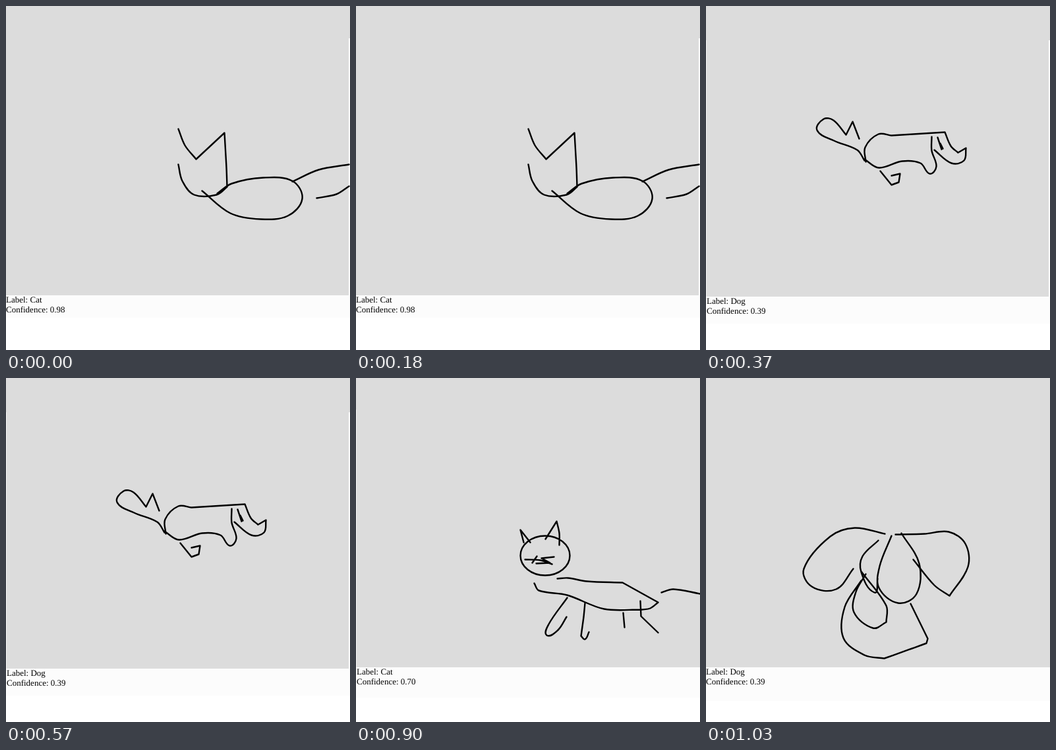
An HTML page with a canvas for the animation above (1.33 s loop, 522 by 522 pixels).

```html
<!DOCTYPE html>
<html lang="en">
<head>
<meta charset="utf-8">
<title>Doodle labels</title>
<style>
html, body { margin: 0; height: 100%; overflow: hidden; background: #fff; }
canvas { display: block; width: 522px; height: 522px; }
</style>
</head>
<body>
<canvas id="stage" width="522" height="522"></canvas>
<script>
const ctx = document.getElementById('stage').getContext('2d');
const LOOP = 1330;

// Each line is one pen stroke: key points of a smooth curve, with "/" after a sharp corner.
const sittingCat = `
  261 186, 271 211, 288 232 / 331 192 / 334 245, 335 274
  261 240, 267 265, 285 286, 319 286, 335 274
  320 284, 342 269, 390 260, 434 265, 449 292, 427 318, 386 323, 340 314, 297 280
  434 266, 474 248, 520 240
  471 291, 501 285, 520 273`;
const runningDog = `
  232 201, 222 175 / 212 195 / 193 173, 178 171, 168 188, 194 204, 229 218, 240 234
  242 236, 241 214, 261 194, 281 196 / 362 191 / 371 212, 382 222 / 394 215 / 391 234, 372 238, 346 218
  342 198, 342 219, 349 243, 339 254, 325 238, 297 235, 262 245, 240 232
  351 199, 357 217
  355 208, 359 216
  264 250 / 281 271 / 292 267 / 294 254 / 281 257`;
const walkingCat = `
  254 249 / 249 230 / 264 249
  287 244 / 304 217 / 308 235, 308 253
  256 275, 279 276, 297 282
  267 280, 274 270
  300 271, 281 273 / 294 280 / 273 281
  305 304, 321 303, 350 308, 404 310 / 458 340 / 446 349, 433 351 / 376 350, 320 329, 277 322, 270 311
  320 333, 292 373, 289 390, 306 382, 319 362
  347 341, 345 362 / 341 391 / 347 396, 353 385
  405 356, 407 378
  431 338, 432 361 / 458 386
  463 325, 481 320, 522 327`;
const dogFace = `
  271 236, 225 227, 188 240, 148 289, 160 316, 197 320, 223 289
  261 246, 237 270, 235 294, 255 325, 260 304
  281 239, 263 285, 262 318, 291 341, 319 327, 323 281, 296 235
  287 237, 331 236, 368 233, 393 251, 397 286, 369 330 / 346 314, 314 275
  242 297, 227 324, 224 355, 253 379, 273 370 / 273 345, 235 293
  235 307, 210 347, 208 394, 240 420, 270 425 / 312 410, 334 402 / 336 395 / 310 342`;

// Joins points with curves whose tangents run parallel to the neighbours' chord.
function addCurve(path, pts) {
  const last = pts.length - 1;
  const tangent = i => {
    const [ax, ay] = pts[Math.max(i - 1, 0)], [bx, by] = pts[Math.min(i + 1, last)];
    const len = Math.hypot(bx - ax, by - ay);
    return [(bx - ax) / len, (by - ay) / len];
  };
  for (let i = 1; i <= last; i++) {
    const [ax, ay] = pts[i - 1], [bx, by] = pts[i];
    const [ux, uy] = tangent(i - 1), [vx, vy] = tangent(i);
    const k = Math.hypot(bx - ax, by - ay) / 3;
    path.bezierCurveTo(ax + ux * k, ay + uy * k, bx - vx * k, by - vy * k, bx, by);
  }
}

function sketch(text) {
  const path = new Path2D();
  for (const stroke of text.trim().split('\n')) {
    let pen;
    for (const part of stroke.split('/')) {
      const pts = part.split(',').map(p => p.trim().split(' ').map(Number));
      if (pen) pts.unshift(pen);
      else path.moveTo(...pts[0]);
      addCurve(path, pts);
      pen = pts[pts.length - 1];
    }
  }
  return path;
}

const catHead = new Path2D();
catHead.ellipse(286.5, 269, 37.5, 30, 0, 0, 2 * Math.PI);
const walker = sketch(walkingCat);
walker.addPath(catHead);

// floor: lower edge of the grey area; foot: lower edge of the pale band
// left, right: top of the light side slivers (0 = none)
const dog = { label: 'Dog', score: '0.39', art: sketch(runningDog), x: 1, floor: 441, foot: 482, left: 52, right: 49 };
const scenes = [
  { end: 300, label: 'Cat', score: '0.98', art: sketch(sittingCat), x: 0, floor: 439, foot: 473, left: 0, right: 49 },
  { end: 370, ...dog },
  { end: 700, ...dog, right: 52 },
  { end: 1030, label: 'Cat', score: '0.70', art: walker, x: 1, floor: 439, foot: 485, left: 48, right: 0 },
  { end: LOOP, label: 'Dog', score: '0.39', art: sketch(dogFace), x: 0, floor: 439, foot: 490, left: 0, right: 0 }
];

function box(color, x, y, w, bottom) {
  ctx.fillStyle = color;
  ctx.fillRect(x, y, w, bottom - y);
}

function draw(s) {
  box('#fff', 0, 0, 522, 522);
  box('#fcfcfc', 0, s.floor, 522, s.foot);
  box('#dcdcdc', 0, 0, 522, s.floor);
  if (s.left) box('#f0f0f0', 0, s.left, 1, s.floor);
  if (s.right) box('#fcfcfc', 520, s.right, 2, s.floor);

  ctx.lineWidth = 2.4;
  ctx.lineCap = ctx.lineJoin = 'round';
  ctx.save();
  ctx.translate(0.5, 0.5);
  ctx.stroke(s.art);
  ctx.restore();

  ctx.fillStyle = '#000';
  ctx.font = '13px "Liberation Serif", Times, serif';
  ctx.textRendering = 'geometricPrecision';
  ctx.fillText('Label: ' + s.label, s.x, s.floor + 11);
  ctx.fillText('Confidence: ' + s.score, s.x, s.floor + 25.5);
}

function tick() {
  const t = performance.now() % LOOP;
  draw(scenes.find(s => t < s.end));
  requestAnimationFrame(tick);
}
tick();
</script>
</body>
</html>
```
